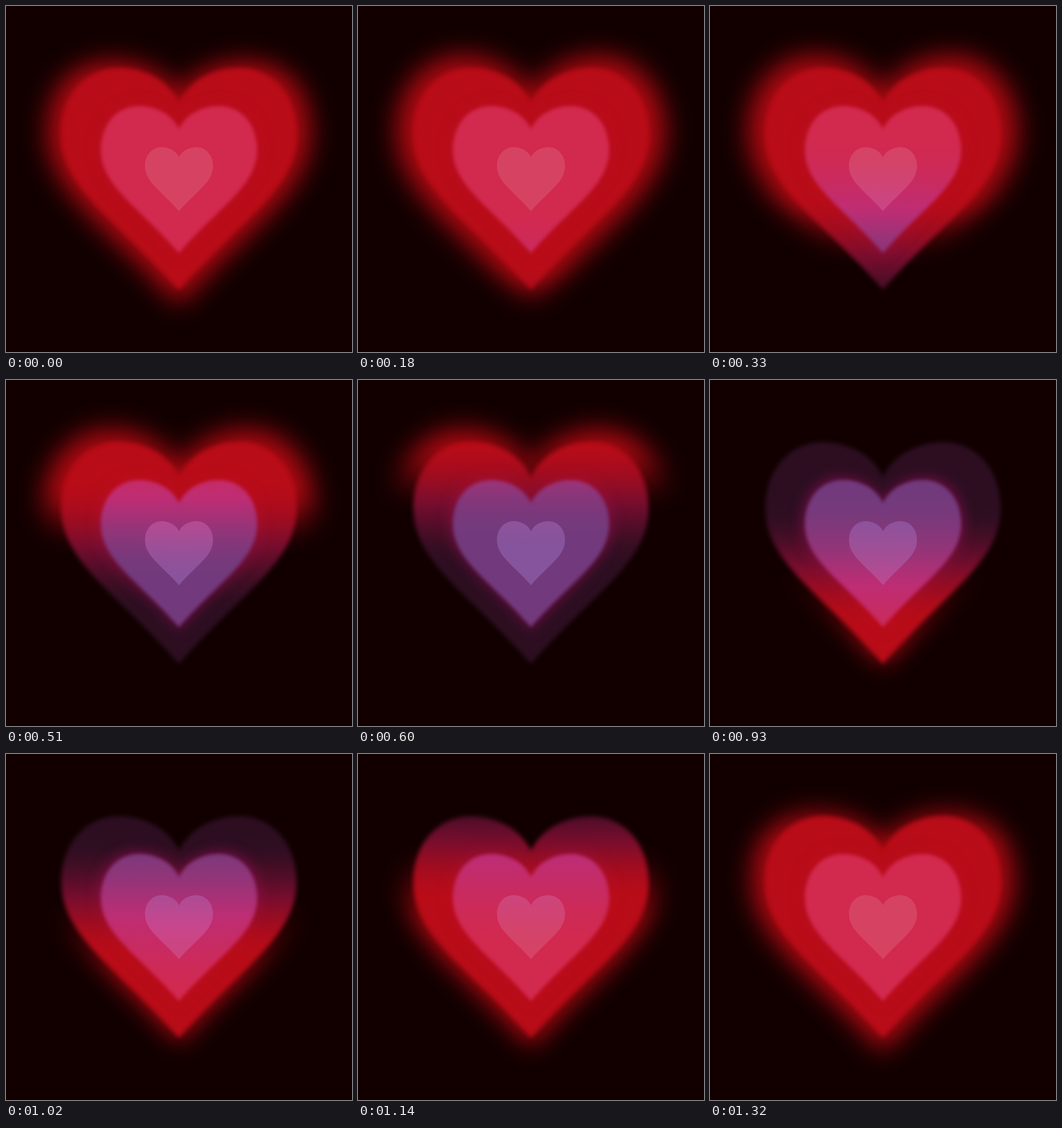
Recreate the animation shown at these times as an HTML page with a canvas. Size 500 by 500 pixels, loop 1350 ms.

```html
<!DOCTYPE html>
<html lang="en">
<head>
<meta charset="utf-8">
<title>Glowing hearts</title>
<style>
  html, body { margin: 0; width: 100%; height: 100%; overflow: hidden; background: #120001; }
  canvas { display: block; width: 500px; height: 500px; }
</style>
</head>
<body>
<canvas id="stage" width="500" height="500"></canvas>
<script>
const SIZE = 500, LOOP = 1350, STEP = 30;
const CX = 250, GLOW_Y = 215;
const BASE = 410, DELAY = 1.45; // the colour wave starts at y = BASE and climbs, ms per px

const ctx = document.getElementById('stage').getContext('2d');
const scratch = makeCanvas();
const brush = scratch.getContext('2d');

// colors run from cold to hot; fall and rise are the phases (ms) of cooling and reheating
const layers = [
  { mask: heartMask(1, 90, 17), grows: true, fall: [130, 290], rise: [720, 920],
    colors: [[150, 8, 18, 0], [165, 9, 18, 0.5], [180, 10, 18, 1]] },
  { mask: heartMask(1, 90, 3), fall: [130, 400], rise: [600, 850],
    colors: [[45, 14, 33, 1], [118, 13, 46, 1], [184, 12, 24, 1]] },
  { mask: heartMask(0.7, 139, 8), fall: [130, 400], rise: [600, 850],
    colors: [[95, 14, 60, 1], [130, 15, 60, 1], [187, 13, 30, 1]] },
  { mask: heartMask(0.664, 144.5, 2.5), fall: [0, 330], rise: [570, 960],
    colors: [[114, 58, 124, 1], [190, 45, 116, 1], [210, 41, 78, 1]] },
  { mask: heartMask(0.289, 204, 0.7), fall: [0, 360], rise: [570, 1000],
    colors: [[134, 84, 156, 1], [200, 70, 142, 1], [214, 67, 98, 1]] }
];

function makeCanvas() {
  const c = document.createElement('canvas');
  c.width = c.height = SIZE;
  return c;
}

function heartMask(scale, top, blur) {
  const c = makeCanvas(), g = c.getContext('2d');
  const heart = new Path2D();
  for (const side of [-1, 1]) {
    const x = v => side * v;
    heart.moveTo(0, 50);
    heart.bezierCurveTo(x(15), 18, x(50), 0, x(87), 0);
    heart.bezierCurveTo(x(135), 0, x(170), 40, x(170), 95);
    heart.bezierCurveTo(x(170), 174, x(91), 216, 0, 320);
    heart.closePath();
  }
  g.filter = `blur(${blur}px)`;
  g.translate(CX, top);
  g.scale(scale, scale);
  g.fill(heart);
  return c;
}

const clamp = v => Math.min(1, Math.max(0, v));

function smooth([from, to], v) {
  const k = clamp((v - from) / (to - from));
  return k * k * (3 - 2 * k);
}

function heatColor({ colors, fall, rise }, phase) {
  const p = ((phase % LOOP) + LOOP) % LOOP;
  const heat = 2 * (1 - smooth(fall, p) + smooth(rise, p));
  const i = heat < 1 ? 0 : 1;
  const mixed = colors[i].map((v, n) => v + (colors[i + 1][n] - v) * (heat - i));
  return `rgba(${mixed.join()})`;
}

function waveGradient(layer, t) {
  const fill = brush.createLinearGradient(0, 0, 0, SIZE);
  for (let y = 0; y <= SIZE; y += 10) {
    fill.addColorStop(y / SIZE, heatColor(layer, t - (BASE - y) * DELAY));
  }
  return fill;
}

// The glow starts small at the tip and swells until the next cooling
function glowScale(t) {
  const age = t < 800 ? t + LOOP : t;
  return 1 + 0.14 * Math.sin(clamp((age - 900) / 750) * Math.PI / 2);
}

function drawLayer(layer, t) {
  const s = layer.grows ? glowScale(t) : 1;
  brush.globalCompositeOperation = 'copy';
  brush.setTransform(s, 0, 0, s, CX * (1 - s), GLOW_Y * (1 - s));
  brush.drawImage(layer.mask, 0, 0);
  brush.resetTransform();
  brush.globalCompositeOperation = 'source-in';
  brush.fillStyle = waveGradient(layer, t);
  brush.fillRect(0, 0, SIZE, SIZE);
  ctx.drawImage(scratch, 0, 0);
}

function draw(t) {
  ctx.fillStyle = '#120001';
  ctx.fillRect(0, 0, SIZE, SIZE);
  for (const layer of layers) drawLayer(layer, t);
}

const start = performance.now();
function tick() {
  const t = (performance.now() - start) % LOOP;
  draw(Math.floor(t / STEP) * STEP);
  requestAnimationFrame(tick);
}
tick();
</script>
</body>
</html>
```
